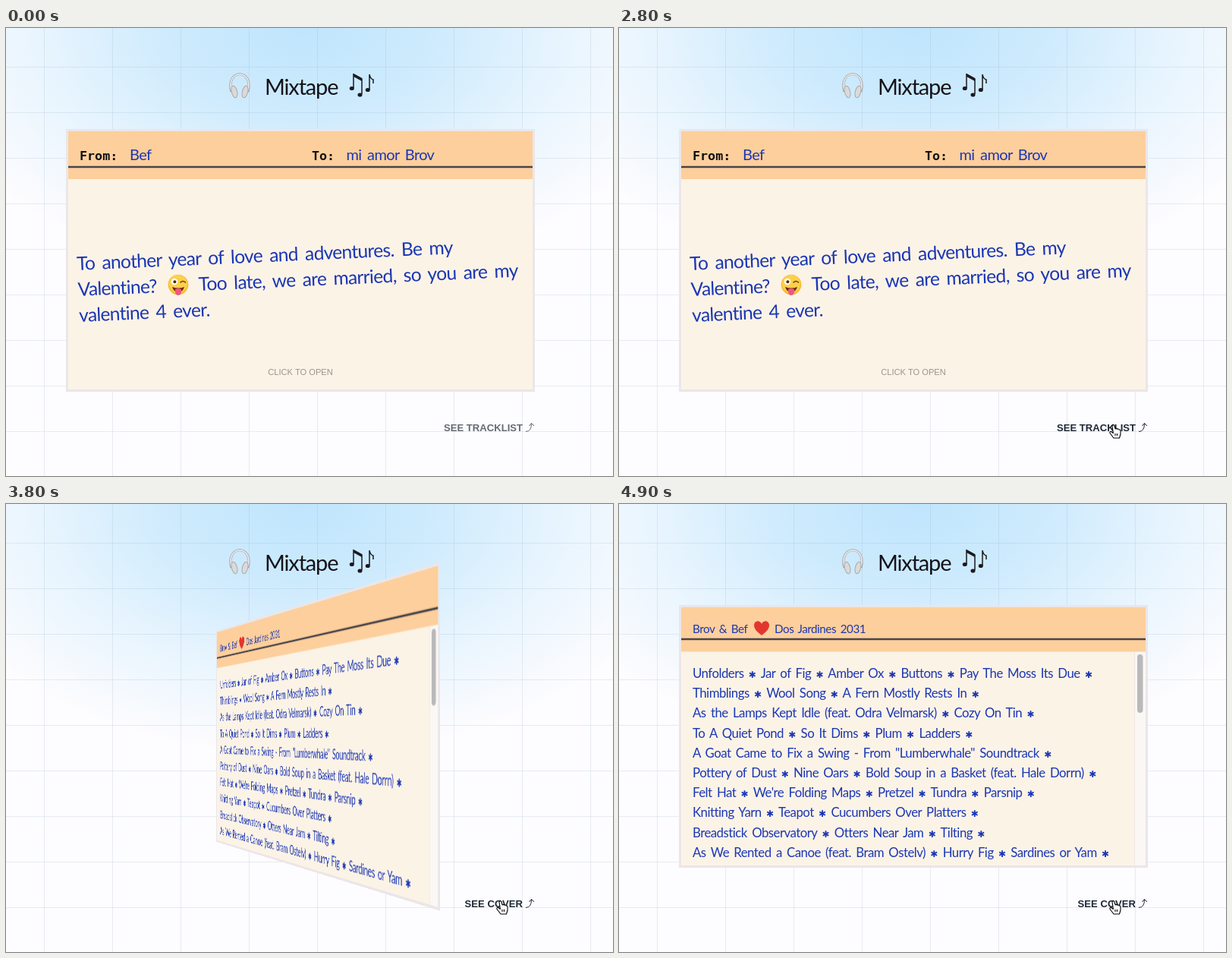
Recreate the animation shown at these times as an HTML page. Size 800 by 590 pixels, loop 5 s.

```html
<!DOCTYPE html>
<html lang="en">
<head>
<meta charset="utf-8">
<title>Mixtape</title>
<style>
  html, body { margin: 0; width: 100%; height: 100%; overflow: hidden; }
  body {
    --grid: rgba(140, 170, 190, .2);
    position: relative;
    background:
      linear-gradient(var(--grid) 1px, transparent 1px) 0 51px / 90px 60px,
      linear-gradient(90deg, var(--grid) 1px, transparent 1px) 50px 0 / 90px 60px,
      radial-gradient(ellipse 520px 330px at 390px 0, #bfe5fd, #cfebfd 35%, #e9f5fe 68%, #fdfcfe00),
      #fdfcfe;
  }
  svg { position: absolute; left: 0; top: 0; }
  .face { left: 79px; top: 132px; }
  .hand { font-family: Lato, "Open Sans", sans-serif; letter-spacing: -.03em; word-spacing: .15em; fill: #1b37b3; }
  .mono { font: bold 16.7px "DejaVu Sans Mono", monospace; fill: #111; }
  .sans { font-family: "Liberation Sans", Arial, sans-serif; }
  .star { font: 12px "DejaVu Sans", sans-serif; letter-spacing: 0; }
  .edge { fill: none; stroke: #ebe6e8; stroke-width: 3; }
</style>
</head>
<body>
<svg width="800" height="590">
  <!-- headphones -->
  <g stroke="#a9a9ad">
    <path d="M297 84C289 53 327 53 319 84" fill="none" stroke-width="3.2"/>
    <path d="M297 82C290 54 326 54 319 82" fill="none" stroke="#ececee" stroke-width="1.5"/>
    <ellipse rx="3.6" ry="8" fill="#dcdad9" transform="translate(301 84) rotate(-14)"/>
    <ellipse rx="3.6" ry="8" fill="#dcdad9" transform="translate(315 84) rotate(14)"/>
  </g>
  <text class="hand" x="341" y="88" font-size="29" style="fill:#15131a;letter-spacing:-.04em">Mixtape</text>
  <!-- notes -->
  <g fill="#1d1a20" stroke="#1d1a20" stroke-width="1.5">
    <path d="M458 79V61L469 67V87M479 81V61Q480 67 484 68V73" fill="none"/>
    <path d="M458 60L469 66V70L458 64Z" stroke="none"/>
    <ellipse cx="455.8" cy="79.5" rx="2.3" ry="1.8"/>
    <ellipse cx="466.5" cy="88" rx="2.3" ry="1.8"/>
    <ellipse cx="476.8" cy="81.5" rx="2.3" ry="1.8"/>
  </g>
</svg>

<svg id="front" class="face" width="618" height="347" viewBox="79 132 618 347">
  <path d="M79 133H697V479H79Z" fill="#fcf3e7"/>
  <path d="M82 136H694V199H82Z" fill="#fdcf9c"/>
  <path d="M82 183H694" stroke="#48444a" stroke-width="2.6"/>
  <text class="mono" x="97" y="174">From:</text>
  <text class="mono" x="403" y="174">To:</text>
  <g class="hand" font-size="20">
    <text x="163" y="174">Bef</text>
    <text x="448.5" y="174">mi amor Brov</text>
  </g>
  <g class="hand" font-size="24.7" transform="rotate(-2.5 94 319)">
    <text x="93.5" y="319">To another year of love and adventures. Be my</text>
    <text x="93.5" y="353">Valentine?</text>
    <text x="252.7" y="353">Too late, we are married, so you are my</text>
    <text x="93.5" y="387">valentine 4 ever.</text>
  </g>
  <!-- winking face -->
  <g transform="translate(227 338)">
    <circle r="13.3" fill="#f9b92f"/>
    <circle cy="-1" r="12" fill="#fdd04b"/>
    <circle cx="-5" cy="-4" r="4.3" fill="#fff"/>
    <circle cx="-4.6" cy="-3.8" r="2" fill="#4a2a12"/>
    <path d="M3 -3Q6 -6 9.5 -3" fill="none" stroke="#6a3c14" stroke-width="1.6" stroke-linecap="round"/>
    <path d="M-8 3Q0 6 8 3Q6 10 0 10Q-6 10 -8 3Z" fill="#6a2a16"/>
    <path d="M-4 6Q0 4 4 6V10Q3 14 0 14Q-3 14 -4 10Z" fill="#f2557f"/>
  </g>
  <text class="sans" x="388" y="457" font-size="11.15" text-anchor="middle" fill="#9d938a">CLICK TO OPEN</text>
  <path class="edge" d="M80.5 134.5H695.5V477.5H80.5Z"/>
</svg>

<svg id="back" class="face" width="618" height="347" viewBox="79 132 618 347">
  <path d="M79 133H697V479H79Z" fill="#fcf3e7"/>
  <path d="M82 136H694V194.5H82Z" fill="#fdcf9c"/>
  <path d="M82 178H694" stroke="#48444a" stroke-width="2.6"/>
  <g class="hand" font-size="15.2">
    <text x="97" y="169.5">Brov &amp; Bef</text>
    <text x="205" y="169.5">Dos Jardines 2031</text>
  </g>
  <path d="M188 173Q177 165 178 159C179 153 186 153 188 158C190 153 197 153 198 159Q199 165 188 173Z" fill="#e3352f"/>
  <g id="list" class="hand" font-size="16.8"></g>
  <path d="M679.5 195H694V476H679.5Z" fill="#faf7f5"/>
  <path d="M679.5 195V476" stroke="#ece6e2"/>
  <rect x="683" y="198" width="7.5" height="77" rx="3.7" fill="#b9b9bc"/>
  <path class="edge" d="M80.5 134.5H695.5V477.5H80.5Z"/>
</svg>

<svg width="800" height="590">
  <g id="link">
    <text id="label" class="sans" x="681" y="531" font-size="13.1" font-weight="bold" text-anchor="end"></text>
    <path d="M685 531.5Q692.5 531.5 692.5 521M689.5 524L692.5 520.5L696 524" fill="none" stroke="currentColor"/>
  </g>
  <g id="cursor" stroke-linejoin="round">
    <path id="arrow" d="M0 0V14.5L3.4 11.4L5.6 16.5L8 15.5L5.8 10.5H10.3Z" stroke="#fff"/>
    <path id="pointer" d="M-2 2Q-1 -.5 .8 1.5L2.2 6Q3.8 4.6 4.8 6.3Q6.3 5.3 7.2 7Q9 6.6 9 9V13L7.5 18H0L-5 11.5Q-5.5 9 -3.3 9.5L-.6 11.5ZM2 12V15M4.5 12V15" fill="#fff" stroke="#000" stroke-width="1.1"/>
  </g>
</svg>

<script>
const LOOP = 5000, STEP = 100;
const HOVER = 2500, CLICK = 3235, TURN = 1500;
const $ = id => document.getElementById(id);

const songs = [
  "Unfolders * Jar of Fig * Amber Ox * Buttons * Pay The Moss Its Due *",
  "Thimblings * Wool Song * A Fern Mostly Rests In *",
  "As the Lamps Kept Idle (feat. Odra Velmarsk) * Cozy On Tin *",
  "To A Quiet Pond * So It Dims * Plum * Ladders *",
  'A Goat Came to Fix a Swing - From "Lumberwhale" Soundtrack *',
  "Pottery of Dust * Nine Oars * Bold Soup in a Basket (feat. Hale Dorrn) *",
  "Felt Hat * We're Folding Maps * Pretzel * Tundra * Parsnip *",
  "Knitting Yarn * Teapot * Cucumbers Over Platters *",
  "Breadstick Observatory * Otters Near Jam * Tilting *",
  "As We Rented a Canoe (feat. Bram Ostelv) * Hurry Fig * Sardines or Yam *",
];
$("list").innerHTML = songs.map((song, i) =>
  `<text x="97" y="${229 + 26.2 * i}">${song.replaceAll("*", '<tspan class="star">✱</tspan>')}</text>`
).join("");

// time, x, y of the cursor tip
const path = [
  [1300, 672, 545], [1400, 674, 539], [1600, 679, 500], [1800, 700, 497], [2000, 711, 503],
  [2200, 705, 510], [2400, 680, 516], [2600, 656, 518], [2700, 652, 522],
];

function cursorAt(t) {
  const i = path.findIndex(p => p[0] > t);
  if (i < 0) return path.at(-1).slice(1);
  const [a, b] = [path[i - 1], path[i]];
  const k = (t - a[0]) / (b[0] - a[0]);
  return [1, 2].map(n => a[n] + (b[n] - a[n]) * k);
}

// cubic-bezier(.25, .1, .25, 1)
function ease(x) {
  if (x <= 0 || x >= 1) return x <= 0 ? 0 : 1;
  const curve = (u, a, b) => 3 * a * u * (1 - u) ** 2 + 3 * b * u * u * (1 - u) + u ** 3;
  let lo = 0, hi = 1;
  for (let i = 0; i < 30; i++) {
    const mid = (lo + hi) / 2;
    if (curve(mid, .25, .25) < x) lo = mid; else hi = mid;
  }
  return curve(lo, .1, 1);
}

function show(id, on) { $(id).style.display = on ? "" : "none"; }

function turn(id, angle) {
  show(id, Math.abs(angle) < 90);
  $(id).style.transform = angle ? `perspective(1122px) rotateY(${angle}deg)` : "none";
}

function draw() {
  const t = Math.floor(performance.now() % LOOP / STEP) * STEP;
  const angle = 180 * ease((t - CLICK) / TURN);
  turn("front", angle);
  turn("back", angle - 180);

  const hover = t >= HOVER, color = hover ? "#1f2937" : "#646b75";
  $("label").textContent = t > CLICK ? "SEE COVER" : "SEE TRACKLIST";
  $("link").style.color = $("link").style.fill = color;

  const visible = t >= path[0][0];
  show("cursor", visible);
  show("arrow", !hover);
  show("pointer", hover);
  if (visible) $("cursor").setAttribute("transform", `translate(${cursorAt(t)})`);
  requestAnimationFrame(draw);
}
draw();
</script>
</body>
</html>
```
